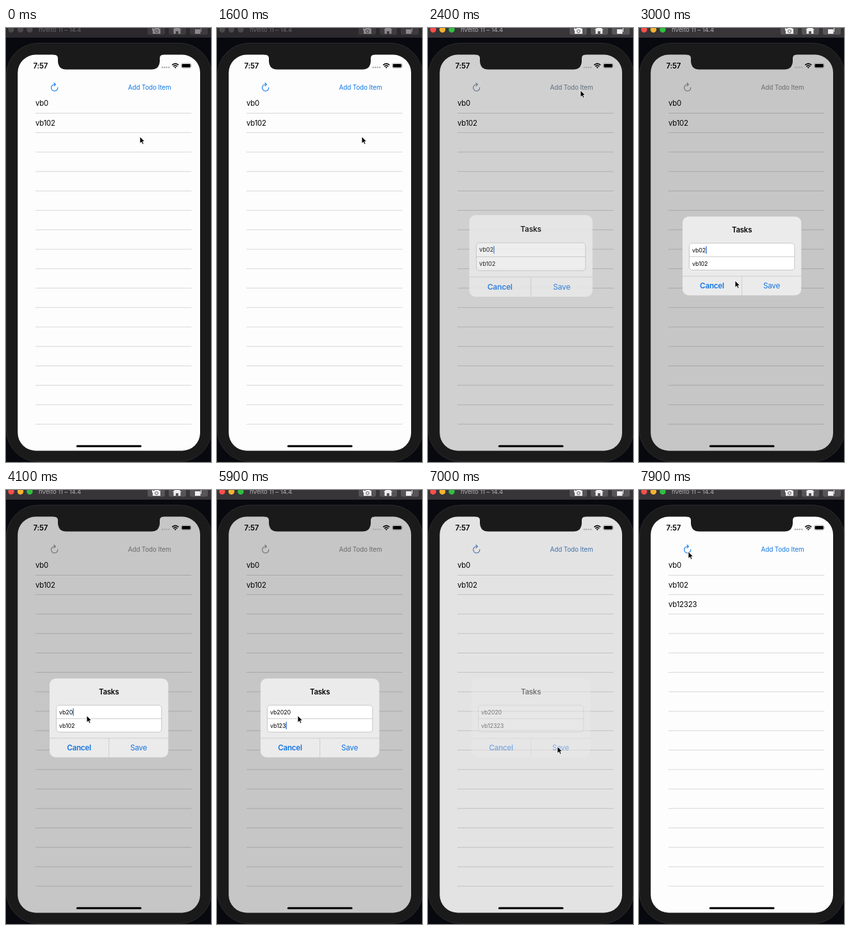
Recreate the animation shown at these times as an HTML page. Size 320x675 px, loop 8000 ms.

```html
<!DOCTYPE html>
<html lang="en">
<head>
<meta charset="utf-8">
<title>Todo list</title>
<style>
  html, body { margin: 0; height: 100%; overflow: hidden; background: #08090f; }
  svg { display: block; width: 100vw; height: 100vh; }
  text { font: 11.4px Inter, "Open Sans", sans-serif; letter-spacing: -.2px; }
  .bold { font-weight: 600; }
  .mid { text-anchor: middle; }
  .blue { fill: #1173e0; font-size: 11.6px; }
  #title { font-size: 9.6px; letter-spacing: -.1px; }
  #link { font-size: 9.9px; letter-spacing: -.1px; }
  #field1, #field2 { font-size: 8.9px; letter-spacing: -.08px; }
</style>
</head>
<body>
<svg viewBox="0 0 320 675">
  <!-- window bar -->
  <rect id="bar" width="320" height="15"/>
  <g id="lights"><circle cx="8" cy="2.5" r="4.7"/><circle cx="22.5" cy="2.5" r="4.7"/><circle cx="37" cy="2.5" r="4.7"/></g>
  <text id="title" x="51" y="6">nVelto 11 – 14.4</text>
  <g id="buttons">
    <rect x="221" y="-8" width="27" height="18.5" rx="3"/>
    <rect x="254" y="-8" width="27" height="18.5" rx="3"/>
    <rect x="287" y="-8" width="28" height="18.5" rx="3"/>
  </g>
  <g id="icons">
    <path d="M229 1h3l1-2h5l1 2h2v8h-12zM228-2h1v6h-1z"/>
    <path d="M260 3l7-6 7 6h-1.6v6h-3.4v-4h-4v4h-3.400v-6z"/>
    <path d="M295 2h8.500v7h-8.500zM297-1h8v7h-1v-6h-7z"/>
  </g>
  <circle id="lens" cx="235" cy="5" r="2.3" fill="none" stroke-width="1"/>

  <!-- device -->
  <rect x=".5" y="23.500" width="320.500" height="651" rx="50" fill="#1b1a1b" stroke="#2b2a2c"/>
  <rect x="18.300" y="41.500" width="284.700" height="616" rx="28" fill="#fefdfe"/>
  <path id="lines" stroke="#d2d1d4" stroke-width=".9"/>
  <g id="rows"></g>
  <text id="link" x="190.500" y="95.800">Add Todo Item</text>
  <path id="reload" fill="none" stroke-width="1.1" stroke-linecap="round" stroke-linejoin="round"
    d="M80.800 92.600A5.100 5.100 0 1 1 75.700 87.800H77.200M74.900 85.400L77.400 87.800L74.900 90.200"/>
  <rect id="dim" x="18.300" y="41.500" width="284.700" height="616" rx="28"/>
  <path d="M74 41H246V41.500Q240.500 41.500 240 46.500V52Q239 64.500 227 64.500H94Q82 64.500 81 52V46.500Q80.500 41.500 74 41.500Z" fill="#1b1a1b"/>
  <text class="bold" x="42.500" y="62.700">7:57</text>
  <g fill="#a9a9ac"><circle cx="244" cy="61.300" r="1.200"/><circle cx="247.400" cy="61.300" r="1.200"/><circle cx="250.800" cy="61.300" r="1.200"/><circle cx="254.200" cy="61.300" r="1.200"/></g>
  <g fill="none" stroke="#000" stroke-width="1.600">
    <path d="M259.300 57.600Q264.300 53 269.300 57.600M261.300 59.800Q264.300 57 267.300 59.800"/>
  </g>
  <path d="M262.700 61.200Q264.300 59.800 265.900 61.200L264.300 62.800Z"/>
  <rect x="273.700" y="55" width="15" height="7.200" rx="2" fill="none" stroke="#8e8e90" stroke-width=".7"/>
  <rect x="274.600" y="55.900" width="13.200" height="5.400" rx="1.200"/>
  <path d="M289.500 57.300q1.300 1.300 0 2.600z" fill="#8e8e90"/>
  <rect x="109.800" y="648.800" width="101.700" height="3.200" rx="1.600"/>

  <!-- alert -->
  <g id="alert">
    <rect x="68" y="293.300" width="185.300" height="122.500" rx="9.500" fill="#ebebec"/>
    <path d="M68 386H253.300M160.600 386V415.800" stroke="#c4c4c7" stroke-width=".8"/>
    <rect id="box" x="78.500" y="334.800" width="164.300" height="41.700" rx="4.500" fill="#fff" stroke="#bcbcbf" stroke-width=".8"/>
    <path d="M78.500 355.700H242.800" stroke="#bcbcbf" stroke-width=".8"/>
    <text class="bold mid" x="160.600" y="318">Tasks</text>
    <text id="field1" x="83" y="348.600"></text>
    <text id="field2" x="83" y="369.700"></text>
    <rect id="caret" width="1.300" height="11.500" fill="#2f6fe0"/>
    <text class="bold mid blue" x="114" y="405.200">Cancel</text>
    <text class="mid blue" x="207" y="405.200">Save</text>
  </g>
  <path id="mouse" d="M0 0V10.500L2.500 8.300L4.200 12L6 11.200L4.400 7.600H7.600Z" stroke="#fff" stroke-width=".8" stroke-linejoin="round"/>
</svg>
<script>
const $ = id => document.getElementById(id);
const clamp = v => Math.max(0, Math.min(1, v));
const set = (id, attrs) => { for (const k in attrs) $(id).setAttribute(k, attrs[k]); };
const mix = (a, b, p) => `rgb(${a.map((v, i) => Math.round(v + (b[i] - v) * p))})`;

const LOOP = 8000;
const path = [ // time, x, y
  [0, 209, 169], [200, 200, 189], [300, 203, 182], [500, 217, 120], [700, 215, 95],
  [1000, 215, 95], [1100, 213, 110], [1300, 201, 180], [1400, 206, 193], [1600, 226, 169],
  [1800, 236, 107], [1900, 238, 97], [2500, 238, 97], [2600, 238, 125], [2800, 221, 304],
  [2900, 198, 365], [3000, 150, 393], [3100, 96, 378], [3200, 112, 358], [3300, 126, 351],
  [6300, 126, 351], [6400, 135, 360], [6600, 190, 395], [6700, 202, 399], [7200, 202, 399],
  [7300, 190, 370], [7500, 110, 150], [7600, 85, 108], [7700, 77, 96], [LOOP, 77, 96]];
const typed1 = [[0, 'vb02'], [3700, 'vb0'], [3800, 'vb'], [3900, 'vb2'], [4100, 'vb20'], [4300, 'vb202'], [4400, 'vb2020']];
const typed2 = [[0, 'vb102'], [5200, 'vb10'], [5600, 'vb1'], [5800, 'vb12'], [5900, 'vb123'], [6000, 'vb1232'], [6100, 'vb12323']];
const textAt = (steps, t) => steps.filter(s => s[0] <= t).pop()[1];

let d = '';
for (let i = 0; i < 17; i++) d += `M46 ${132.5 + i * 30.23}H289.500`;
set('lines', { d });
$('rows').innerHTML = ['vb0', 'vb102', 'vb12323']
  .map((s, i) => `<text x="46" y="${121.3 + i * 30.23}">${s}</text>`).join('');

function mouseAt(t) {
  const i = path.findIndex(k => k[0] > t);
  const [t0, x0, y0] = path[i - 1], [t1, x1, y1] = path[i];
  const p = (t - t0) / (t1 - t0);
  return [x0 + (x1 - x0) * p, y0 + (y1 - y0) * p];
}

function draw(t) {
  const active = t >= 2000;
  set('bar', { fill: active ? '#373538' : '#2b292c' });
  set('title', { fill: active ? '#b2b0b3' : '#6c6a6d' });
  set('buttons', { fill: active ? '#575558' : '#3d3b3e' });
  set('icons', { fill: active ? '#f0eff0' : '#8b898c' });
  set('lens', { stroke: active ? '#575558' : '#3d3b3e' });
  [...$('lights').children].forEach((c, i) =>
    c.setAttribute('fill', active ? ['#fb4f49', '#f5b32f', '#2fc041'][i] : '#4b494c'));

  // the alert springs in, then fades out
  const open = t < 2200 ? 0 : 1 - Math.exp((2200 - t) / 120);
  const out = clamp((t - 6780) / 420);
  const shown = open * (1 - out * out * (3 - 2 * out));
  const scale = 1.2 - .2 * open;
  set('dim', { opacity: .22 * shown });
  set('alert', { opacity: shown, transform: `translate(160.600 354.500) scale(${scale}) translate(-160.600 -354.500)` });
  set('box', { 'fill-opacity': shown ** 3 });
  const tint = mix([12, 118, 226], [136, 136, 140], shown);
  set('link', { fill: tint });
  set('reload', { stroke: tint });

  $('field1').textContent = textAt(typed1, t);
  $('field2').textContent = textAt(typed2, t);
  const second = t >= 4800;
  set('caret', {
    x: 83.2 + $(second ? 'field2' : 'field1').getComputedTextLength(),
    y: second ? 360.6 : 339.5,
    opacity: t < 6800 ? 1 : 0
  });
  $('rows').lastChild.setAttribute('opacity', t >= 7800 ? 1 : 0);
  set('mouse', { transform: `translate(${mouseAt(t)})` });
}

function tick(now) {
  draw(Math.floor(now % LOOP / 100) * 100);
  requestAnimationFrame(tick);
}
tick(0);
</script>
</body>
</html>
```
